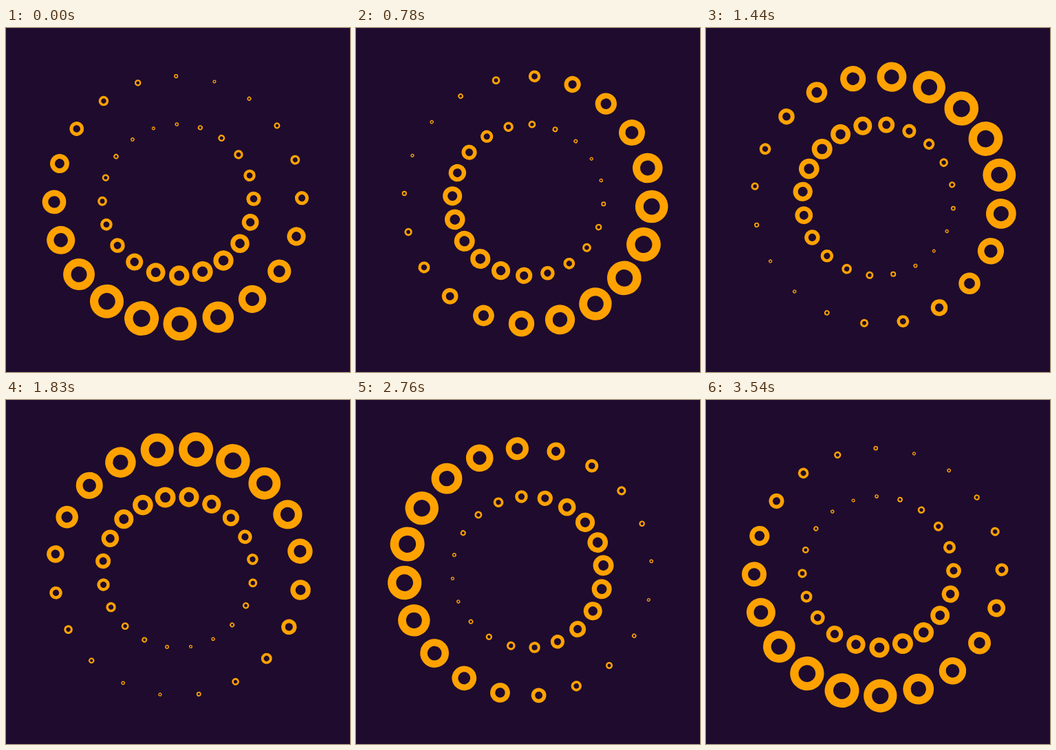
Recreate the animation shown at these times as an HTML page without scripts. Size 500 by 500 pixels, loop 3.57 s.

```html
<!DOCTYPE html>
<html lang="en">
<head>
<meta charset="utf-8">
<title>Counter-rotating rings</title>
<style>
  @property --turn {
    syntax: "<number>";
    inherits: true;
    initial-value: -0.05;
  }

  html, body {
    margin: 0;
    height: 100%;
    overflow: hidden;
    background: #1e0b2e;
  }

  svg {
    display: block;
    width: 100%;
    height: 100%;
    animation: turn 3570ms steps(119) -3ms infinite;
  }

  @keyframes turn {
    from { --turn: -0.05; }
    to   { --turn: 0.95; }
  }

  /* Dots creep one slot per loop while a size wave makes a full turn:
     --dir 1 runs it counterclockwise, -1 clockwise. */
  .dot {
    --angle: calc((var(--i) + var(--turn)) * 18deg);
    --wave: cos(var(--angle) + var(--dir) * var(--turn) * 360deg);
    --size: calc((var(--max) + 2.5) / 2 - (var(--max) - 2.5) / 2 * var(--wave));
    fill: none;
    stroke: #ffa200;
    stroke-width: 0.5;
    transform-origin: 0 0;
    transform: rotate(var(--angle)) translateY(var(--radius)) scale(var(--size));
  }

  .outer { --radius: -180px; --max: 25; --dir: 1; }
  .inner { --radius: -110px; --max: 15; --dir: -1; }
</style>
</head>
<body>
<svg viewBox="-250 -250 500 500">
  <defs>
    <g id="pair">
      <circle class="dot outer" r="0.75"/>
      <circle class="dot inner" r="0.75"/>
    </g>
  </defs>
  <use href="#pair" style="--i:0"/>
  <use href="#pair" style="--i:1"/>
  <use href="#pair" style="--i:2"/>
  <use href="#pair" style="--i:3"/>
  <use href="#pair" style="--i:4"/>
  <use href="#pair" style="--i:5"/>
  <use href="#pair" style="--i:6"/>
  <use href="#pair" style="--i:7"/>
  <use href="#pair" style="--i:8"/>
  <use href="#pair" style="--i:9"/>
  <use href="#pair" style="--i:10"/>
  <use href="#pair" style="--i:11"/>
  <use href="#pair" style="--i:12"/>
  <use href="#pair" style="--i:13"/>
  <use href="#pair" style="--i:14"/>
  <use href="#pair" style="--i:15"/>
  <use href="#pair" style="--i:16"/>
  <use href="#pair" style="--i:17"/>
  <use href="#pair" style="--i:18"/>
  <use href="#pair" style="--i:19"/>
</svg>
</body>
</html>
```
